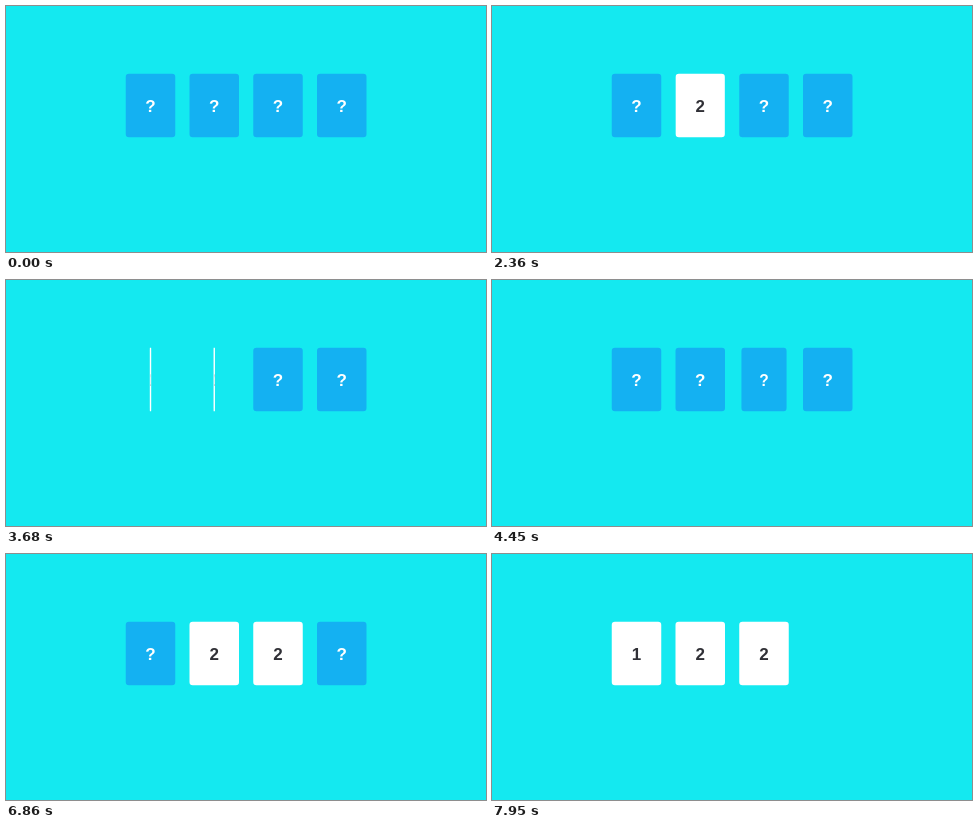
Write an HTML page that moves like this. It is 480x246 px and loops after 8000 ms.

```html
<!DOCTYPE html>
<html lang="en">
<head>
<meta charset="utf-8">
<title>Memory cards</title>
<style>
  html, body { margin: 0; width: 100%; height: 100%; overflow: hidden; background: #14e9f0; }
  svg { display: block; width: 100%; height: 100%; }
  text { font: bold 17px "Liberation Sans", Arial, sans-serif; text-anchor: middle; }
</style>
</head>
<body>
<svg id="stage" viewBox="0 0 480 246"></svg>
<script>
const LOOP = 8000, HOLD = 7950, FLIP = 800;
const W = 49.5, H = 63.5, PITCH = 63.75, LEFT = 144.5, MID = 99.5;

// Each card turns over at every listed time.
const cards = [
  { value: 1, turns: [2552, 3450, 6870] },
  { value: 2, turns: [1759, 3450, 5235] },
  { value: 2, turns: [4352] },
  { value: 3, turns: [7715] }
];

const stage = document.getElementById('stage');

function add(parent, tag, attrs) {
  const el = document.createElementNS('http://www.w3.org/2000/svg', tag);
  for (const key in attrs) el.setAttribute(key, attrs[key]);
  return parent.appendChild(el);
}

cards.forEach((card, i) => {
  card.x = LEFT + i * PITCH;
  card.group = add(stage, 'g');
  card.face = add(card.group, 'rect', { x: -W / 2, y: -H / 2, width: W, height: H, rx: 3.2 });
  card.label = add(card.group, 'text', { y: 6 });
});

const bezier = (u, a, b) => 3 * (1 - u) * (1 - u) * u * a + 3 * (1 - u) * u * u * b + u * u * u;

// cubic-bezier(.25, .1, .25, 1)
function ease(x) {
  if (x <= 0) return 0;
  if (x >= 1) return 1;
  let lo = 0, hi = 1;
  for (let i = 0; i < 24; i++) {
    const u = (lo + hi) / 2;
    if (bezier(u, 0.25, 0.25) < x) lo = u; else hi = u;
  }
  return bezier(lo, 0.1, 1);
}

function turnOf(card, t) {
  return card.turns.reduce((sum, start, i) =>
    sum + (i % 2 ? -1 : 1) * ease((t - start) / FLIP), 0);
}

function draw(t) {
  for (const card of cards) {
    const c = Math.cos(Math.PI * turnOf(card, t));
    const open = c < 0;
    const width = Math.abs(c);
    card.group.setAttribute('transform', `translate(${card.x} ${MID}) scale(${width.toFixed(4)} 1)`);
    card.group.setAttribute('visibility', width < 0.015 ? 'hidden' : 'visible');
    card.face.setAttribute('fill', open ? '#fff' : '#14b1f2');
    card.label.setAttribute('fill', open ? '#303036' : '#fff');
    card.label.textContent = open ? card.value : '?';
  }
}

const origin = performance.now();
function tick() {
  const t = (performance.now() - origin) % LOOP;
  draw(Math.min(t, HOLD));
  requestAnimationFrame(tick);
}
tick();
</script>
</body>
</html>
```
